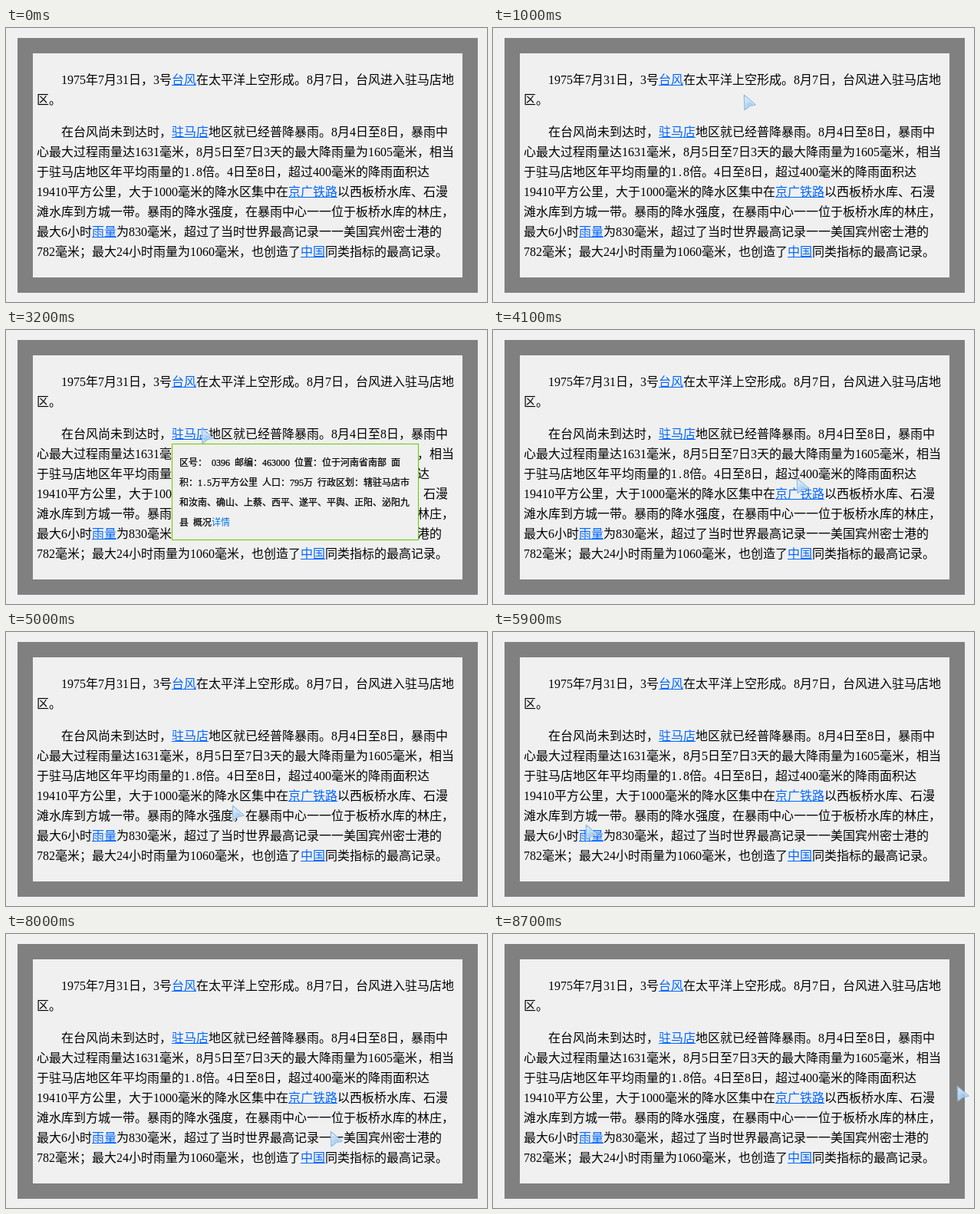
Write an HTML page that moves like this. It is 627x357 px and loops after 8800 ms.

```html
<!DOCTYPE html>
<html lang="zh-CN">
<head>
<meta charset="utf-8">
<title>词语提示</title>
<style>
  html, body { margin: 0; width: 100%; height: 100%; overflow: hidden; background: #f0f0f0; }
  svg { display: block; }
  text {
    font-family: "Liberation Serif", "Noto Sans CJK SC", "Noto Sans CJK", sans-serif;
    fill: #000; white-space: pre; text-anchor: middle;
  }
  text.link { fill: #06f; }
  text.more { fill: #0073e6; }
  text.strong { font-weight: bold; }
  #tips text { stroke: #000; stroke-width: .25px; }
  #tips text.more { stroke: none; }
</style>
</head>
<body>
<svg id="stage" width="627" height="357" viewBox="0 0 627 357">
  <defs>
    <linearGradient id="ice" x1="0" y1="0" x2=".6" y2="1">
      <stop offset="0" stop-color="#d9edfc"/>
      <stop offset=".55" stop-color="#b5d8f6"/>
      <stop offset="1" stop-color="#85b6e6"/>
    </linearGradient>
  </defs>
  <rect width="627" height="357" fill="#f0f0f0"/>
  <rect x="15" y="13" width="600" height="332" fill="#808080"/>
  <rect x="35" y="33" width="560" height="292" fill="#f0f0f0"/>
  <g id="article"></g>
  <g id="tips"></g>
  <g id="cursor" opacity=".92" stroke-linejoin="round">
    <path d="M1.5 1.5 L16 14 L8.5 15.5 L2 20.5 Z" fill="#fff" stroke="#8dbbe4" stroke-width="1.6"/>
    <path d="M3 4.5 L13.2 13.4 L7.8 14.4 L3.2 17.8 Z" fill="url(#ice)"/>
  </g>
</svg>
<script>
const LOOP = 8800, STEP = 100;
const byId = id => document.getElementById(id);

function add(parent, tag, attrs, content) {
  const el = document.createElementNS("http://www.w3.org/2000/svg", tag);
  for (const key in attrs) el.setAttribute(key, attrs[key]);
  if (content) el.textContent = content;
  parent.appendChild(el);
  return el;
}

// Centres text in grid cells: wide characters take one em, ASCII half an em.
// [..] marks a link, {..} marks strong text.
function line(parent, source, x, middle, size, linkClass) {
  for (const part of source.match(/\[.*?\]|\{.*?\}|[^\[{]+/g)) {
    const isLink = part[0] === "[", isStrong = part[0] === "{";
    const content = isLink || isStrong ? part.slice(1, -1) : part;
    const start = x, places = [];
    for (const char of content) {
      const cell = char < "\x80" ? size / 2 : size;
      places.push(x + cell / 2);
      x += cell;
    }
    add(parent, "text", {
      x: places.join(" "),
      y: middle + Math.round(size * .38),
      "font-size": size,
      class: isLink ? linkClass : isStrong ? "strong" : ""
    }, content);
    if (linkClass === "link" && isLink)
      add(parent, "rect", { x: start, y: middle + 7, width: x - start, height: 1, fill: "#06f" });
  }
}

function paragraph(middle, rows) {
  rows.forEach((row, i) => line(byId("article"), row, i ? 40 : 72, middle + i * 26, 16, "link"));
}

paragraph(67, [
  "1975年7月31日，3号[台风]在太平洋上空形成。8月7日，台风进入驻马店地",
  "区。"
]);
paragraph(135, [
  "在台风尚未到达时，[驻马店]地区就已经普降暴雨。8月4日至8日，暴雨中",
  "心最大过程雨量达1631毫米，8月5日至7日3天的最大降雨量为1605毫米，相当",
  "于驻马店地区年平均雨量的1.8倍。4日至8日，超过400毫米的降雨面积达",
  "19410平方公里，大于1000毫米的降水区集中在[京广铁路]以西板桥水库、石漫",
  "滩水库到方城一带。暴雨的降水强度，在暴雨中心一一位于板桥水库的林庄，",
  "最大6小时[雨量]为830毫米，超过了当时世界最高记录一一美国宾州密士港的",
  "782毫米；最大24小时雨量为1060毫米，也创造了[中国]同类指标的最高记录。"
]);

function tip(x, y, spans, rows) {
  const g = add(byId("tips"), "g", {});
  add(g, "rect", {
    x: x + .5, y: y + .5, width: 321, height: 21 + rows.length * 26,
    fill: "#f0f0f0", stroke: "#66cc00"
  });
  rows.forEach((row, i) => line(g, row, x + 10, y + 24 + i * 26, 12, "more"));
  return { g, spans };
}

const tips = [
  tip(216, 80, [[1700, 2600]], [
    "台风（typhoon），和飓风都是产生于热带洋面上的一种",
    "强烈的气旋，只是发生地点不同，叫法不同，在北太平洋",
    "西部、国际日期变更线以西，包括南中国海范围内发生的",
    "强热带气旋（其中风速要超过{３２．６}米／秒）称为台",
    "风；而在大西洋或北太平洋东部的热带气旋则称飓风，也",
    "就是说在美国一带称飓风，在菲律宾、中国、日本一带叫",
    "台风。[详情]"
  ]),
  tip(216, 148, [[3200, 3500]], [
    "区号： 0396 邮编：463000 位置：位于河南省南部 面",
    "积：1.5万平方公里 人口：795万 行政区划：辖驻马店市",
    "和汝南、确山、上蔡、西平、遂平、平舆、正阳、泌阳九",
    "县 概况[详情]"
  ]),
  tip(273, 226, [[4300, 4700], [8500, 8700]], [
    "京广铁路北起北京，南至广州，是中国最重要的南北铁路",
    "干线之一，全长2300多公里。[详情]"
  ]),
  tip(112, 121, [[6100, 6800]], [
    "雨量是指在一定时段内，降落到水平面上的雨水，在未经",
    "蒸发、渗透和流失的情况下所积成的深度，以毫米为单位",
    "计算。气象部门用雨量器或雨量计进行测量，并按二十四",
    "小时的雨量划分等级。[详情]"
  ]),
  tip(273, 147, [[7200, 7600]], [
    "中国（China），位于东亚，是一个以华夏文明为主体、",
    "中华文化为基础，以汉族为主要民族的统一多民族国家，",
    "通用汉语。中国疆域内的各个民族统称为中华民族，龙是",
    "中华民族的象征。[详情]"
  ])
];

// Pointer tip: time, x, y
const path = [
  [100, 625, 128], [300, 625, 128], [400, 598, 111], [1200, 235, 77], [1600, 220, 69],
  [2500, 220, 69], [2900, 154, 98], [3200, 254, 127], [3400, 254, 127], [3700, 305, 102],
  [4100, 395, 192], [4300, 397, 198], [4600, 397, 198], [5500, 165, 258], [5900, 120, 250],
  [6100, 118, 255], [6700, 118, 255], [7200, 393, 294], [7600, 420, 290], [8500, 425, 214],
  [8600, 425, 214], [8700, 604, 197]
];

function pointerAt(t) {
  const next = path.findIndex(key => key[0] >= t);
  const b = path[next], a = path[Math.max(0, next - 1)];
  const k = a === b ? 0 : (t - a[0]) / (b[0] - a[0]);
  return [1, 2].map(i => Math.round(a[i] + (b[i] - a[i]) * k));
}

function draw(time) {
  const t = Math.floor(time % LOOP / STEP) * STEP;
  for (const { g, spans } of tips)
    g.setAttribute("display", spans.some(([from, to]) => t >= from && t < to) ? "inline" : "none");
  const cursor = byId("cursor");
  cursor.setAttribute("display", t < path[0][0] ? "none" : "inline");
  cursor.setAttribute("transform", `translate(${pointerAt(t)})`);
}

const begin = performance.now();
function tick() {
  draw(performance.now() - begin);
  requestAnimationFrame(tick);
}
tick();
</script>
</body>
</html>
```
